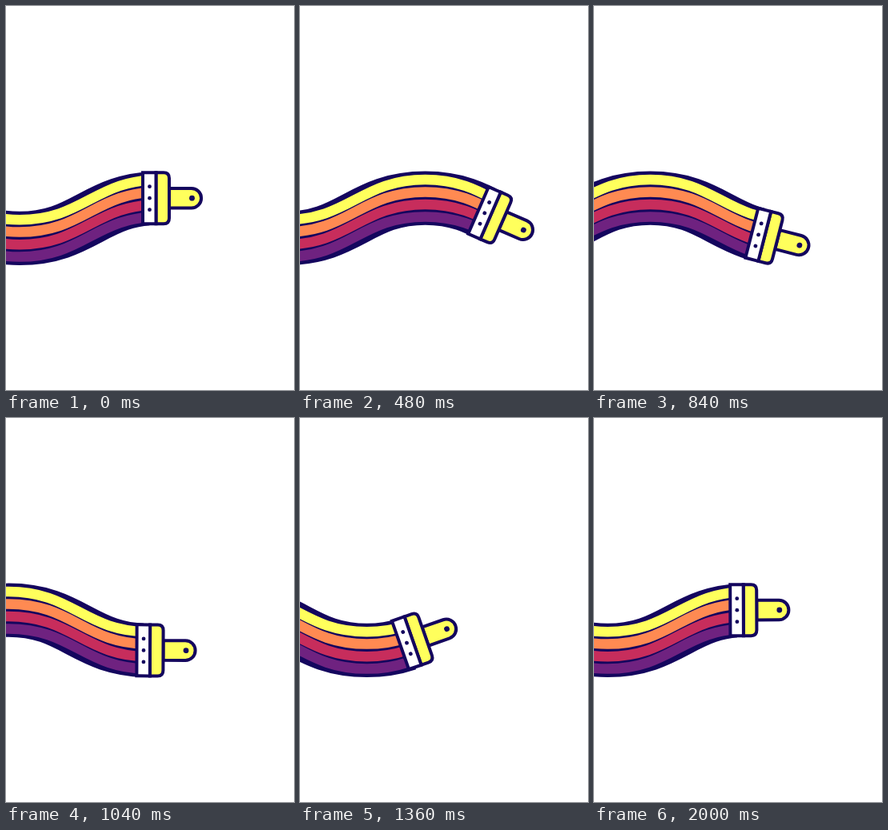
Write an HTML page that moves like this. It is 360x480 px and loops after 2040 ms.

```html
<!DOCTYPE html>
<html lang="en">
<head>
<meta charset="utf-8">
<title>Paint wave</title>
<style>
  html, body { margin: 0; width: 100%; height: 100%; overflow: hidden; background: #fff; }
  svg { display: block; width: 100%; height: 100%; }
  .ink { stroke: #14065e; stroke-width: 4; }
  .dots { fill: #14065e; }
</style>
</head>
<body>
<svg viewBox="0 0 360 480">
  <clipPath id="painted"><rect id="edge" x="-500" y="-500" width="500" height="1000"/></clipPath>
  <g id="wave" fill="none" clip-path="url(#painted)"></g>
  <g id="brush">
    <path class="ink" fill="#ffff5c" d="M24.5 -12.3H52.3A12.3 12.3 0 0 1 52.3 12.3H24.5Z"/>
    <path class="ink" fill="#ffff5c" d="M8 -32H17.5Q24.5 -32 24.5 -25V25Q24.5 32 17.5 32H8Z"/>
    <path class="ink" fill="#fff" d="M-8.5 -32H8V32H-8.5Z"/>
    <g class="dots">
      <circle cx="53" r="3.4"/>
      <circle cy="-14.5" r="2.4"/>
      <circle r="2.4"/>
      <circle cy="14.5" r="2.4"/>
    </g>
  </g>
</svg>
<script>
const LOOP = 2040, STEP = 40;
const LENGTH = 350, HALF = LENGTH / 2, MID = 265.3, HEIGHT = 25.1;
const CREST = 192, LEAD = 20, HANDLE = 0.46 * HALF;
const K = 2 * Math.PI / LENGTH;

// time, brush x on the stage, brush distance along its swing
const KEYS = [
  [0, 179.5, 0], [320, 225.5, 45], [480, 230.8, 73], [640, 228.3, 101],
  [1040, 172, 174.5], [1120, 159, 182], [1360, 133.5, 224.5],
  [1520, 128.8, 253], [1680, 136.4, 284], [2000, 178.8, 349.5]
];
// color, width, vertical shift
const LAYERS = [
  ['#14065e', 67.2, 0], ['#ffff5c', 12.5, -23.2], ['#ff8a52', 12.5, -7.8],
  ['#c72d5c', 12.5, 7.8], ['#6f2280', 12.5, 23.2]
];

const waveGroup = document.getElementById('wave');
const brush = document.getElementById('brush');
const edge = document.getElementById('edge');

for (const [color, width, shift] of LAYERS) {
  const path = document.createElementNS('http://www.w3.org/2000/svg', 'path');
  path.setAttribute('stroke', color);
  path.setAttribute('stroke-width', width);
  path.setAttribute('transform', `translate(0 ${shift})`);
  waveGroup.appendChild(path);
}

// Key lookup that wraps around the loop
function key(i, column) {
  const n = KEYS.length, turn = Math.floor(i / n);
  return KEYS[i - turn * n][column] + turn * [LOOP, 0, LENGTH][column];
}

function slopeAt(i, column) {
  const before = key(i, 0) - key(i - 1, 0), after = key(i + 1, 0) - key(i, 0);
  const left = (key(i, column) - key(i - 1, column)) / before;
  const right = (key(i + 1, column) - key(i, column)) / after;
  return (left * after + right * before) / (before + after);
}

function interpolate(t, column) {
  let i = KEYS.length - 1;
  while (key(i, 0) > t) i--;
  const span = key(i + 1, 0) - key(i, 0), s = (t - key(i, 0)) / span, r = 1 - s;
  return key(i, column) * (1 + 2 * s) * r * r + key(i + 1, column) * s * s * (3 - 2 * s)
    + span * s * r * (slopeAt(i, column) * r - slopeAt(i + 1, column) * s);
}

// cubic-bezier(.5, 0, .5, 1)
function ease(p) {
  let low = 0, high = 1, s = 0.5;
  for (let i = 0; i < 24; i++) {
    if (1.5 * s * (1 - s) + s * s * s < p) low = s; else high = s;
    s = (low + high) / 2;
  }
  return s * s * (3 - 2 * s);
}

function wavePath(crest) {
  let x = crest - LENGTH, y = MID - HEIGHT, d = `M${x} ${y}`;
  for (let i = 0; i < 5; i++) {
    const nextX = x + HALF, nextY = 2 * MID - y;
    d += `C${x + HANDLE} ${y} ${nextX - HANDLE} ${nextY} ${nextX} ${nextY}`;
    x = nextX;
    y = nextY;
  }
  return d;
}

function draw(t) {
  const wave = wavePath(CREST - LENGTH * ease((t + LEAD) % LOOP / LOOP));
  for (const path of waveGroup.children) path.setAttribute('d', wave);

  const x = interpolate(t, 1), swing = K * interpolate(t, 2);
  const y = MID - HEIGHT * Math.cos(swing);
  const angle = Math.atan(HEIGHT * K * Math.sin(swing)) * 180 / Math.PI;
  const pose = `translate(${x} ${y}) rotate(${angle})`;
  brush.setAttribute('transform', pose);
  edge.setAttribute('transform', pose);
}

const start = performance.now();
function tick() {
  const t = (performance.now() - start) % LOOP;
  draw(Math.floor(t / STEP) * STEP);
  requestAnimationFrame(tick);
}
tick();
</script>
</body>
</html>
```
